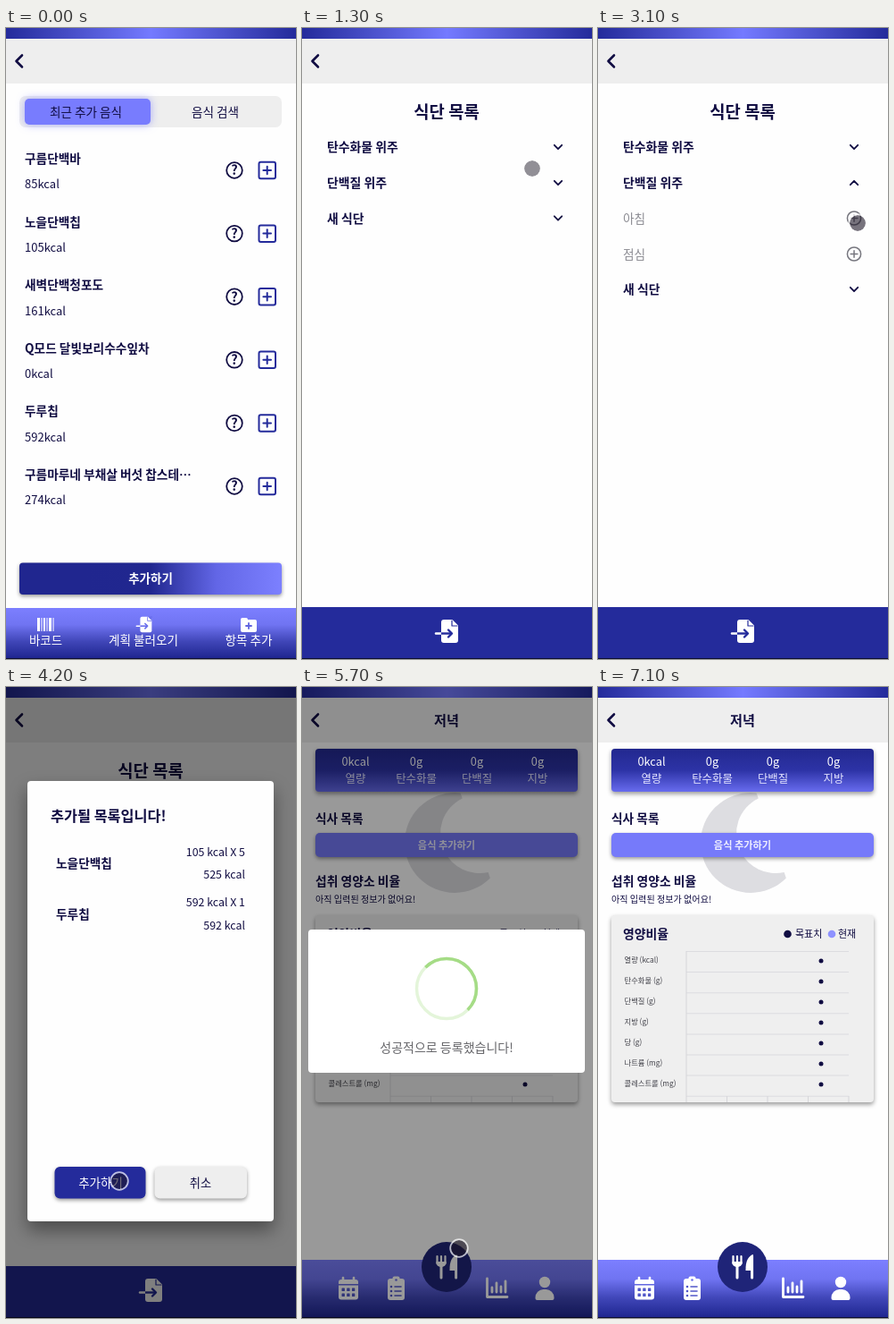
Recreate the animation shown at these times as an HTML page with a canvas. Size 325 by 705 pixels, loop 7600 ms.

```html
<!DOCTYPE html>
<html lang="ko">
<head>
<meta charset="utf-8">
<title>식단 추가</title>
<style>
html, body { margin: 0; width: 100%; height: 100%; overflow: hidden; background: #fff; }
canvas { display: block; width: 325px; height: 705px; }
</style>
</head>
<body>
<canvas id="stage" width="325" height="705"></canvas>
<script>
const ctx = document.getElementById('stage').getContext('2d');
const W = 325, H = 705, LOOP = 7600, STEP = 100;
const NAVY = '#100c42', INDIGO = '#242b9b', LILAC = '#787cfe', PALE = '#eeeeee', GREEN = '#a5dc86';
const FONT = '"Noto Sans CJK KR", "Noto Sans CJK", "Noto Sans", sans-serif';

const BAR = '구름단백바', CHIP = '노을단백칩', SNACK = '두루칩';
const APPLE = '새벽단백청포도', TEA = 'Q모드 달빛보리수수잎차', STEAK = '구름마루네 부채살 버섯 찹스테⋯';
const FOODS = [[BAR, 85], [CHIP, 105], [APPLE, 161], [TEA, 0], [SNACK, 592], [STEAK, 274]];
const FOODS_AFTER = [FOODS[0], FOODS[2], FOODS[3], FOODS[5], ['점심상 어느만큼 담아볼까 닭가⋯', 175], ['', 350]];

const clamp = v => Math.max(0, Math.min(1, v));
const progress = (t, from, to) => clamp((t - from) / (to - from));
const ease = p => p * p * (3 - 2 * p);
const mix = (a, b, p) => a + (b - a) * p;

function text(str, x, y, size, color = NAVY, weight = 400, align = 'left') {
  ctx.font = `${weight} ${size}px ${FONT}`;
  ctx.fillStyle = color;
  ctx.textAlign = align;
  ctx.fillText(str, x, y + size * 0.37);
}

function box(x, y, w, h, r, fill, shadow = 0) {
  ctx.save();
  if (shadow) {
    ctx.shadowColor = 'rgba(0,0,0,.4)';
    ctx.shadowBlur = shadow;
    ctx.shadowOffsetY = shadow / 2;
  }
  ctx.fillStyle = fill;
  ctx.beginPath();
  ctx.roundRect(x, y, w, h, r);
  ctx.fill();
  ctx.restore();
}

function disc(x, y, r, fill) {
  ctx.fillStyle = fill;
  ctx.beginPath();
  ctx.arc(x, y, r, 0, Math.PI * 2);
  ctx.fill();
}

function ring(x, y, r, color, width, from = 0, to = Math.PI * 2) {
  ctx.strokeStyle = color;
  ctx.lineWidth = width;
  ctx.beginPath();
  ctx.arc(x, y, r, from, to);
  ctx.stroke();
}

function line(points, color, width, cap = 'round') {
  ctx.strokeStyle = color;
  ctx.lineWidth = width;
  ctx.lineCap = cap;
  ctx.lineJoin = 'round';
  ctx.beginPath();
  points.forEach(([x, y]) => ctx.lineTo(x, y));
  ctx.stroke();
}

function plus(x, y, r, color, width) {
  line([[x - r, y], [x + r, y]], color, width);
  line([[x, y - r], [x, y + r]], color, width);
}

function gradient(x0, y0, x1, y1, ...colors) {
  const g = ctx.createLinearGradient(x0, y0, x1, y1);
  colors.forEach((c, i) => g.addColorStop(i / (colors.length - 1), c));
  return g;
}

function dim(alpha) {
  ctx.fillStyle = `rgba(0,0,0,${alpha})`;
  ctx.fillRect(0, 0, W, H);
}

function frame() {
  box(0, 0, W, H, 0, '#fefefe');
  box(0, 12, W, 50, 0, PALE);
  box(0, 0, W, 12, 0, gradient(0, 0, W, 0, INDIGO, '#747aff', INDIGO));
  line([[18, 30.5], [11.5, 37], [18, 43.5]], NAVY, 2.6);
}

function bottomBar(y, fill) {
  box(0, y, W, H - y, 0, fill);
  box(0, 704, W, 1, 0, '#0c0e30');
}

const glow = y => gradient(0, y, 0, 704, '#7c7fff', '#7074f2', '#4046b8', '#1f2690');

function fileImport(x, y, s, bg) {
  ctx.save();
  ctx.translate(x, y);
  ctx.scale(s, s);
  ctx.fillStyle = '#fff';
  ctx.beginPath();
  ctx.roundRect(-6, -13, 19, 26, 3);
  ctx.fill();
  ctx.fillStyle = bg;
  ctx.beginPath();
  ctx.moveTo(6, -13.5);
  ctx.lineTo(13.5, -13.5);
  ctx.lineTo(13.5, -6);
  ctx.fill();
  line([[6, -12], [6, -6], [12, -6]], bg, 1.2);
  line([[-12, 2.5], [-6, 2.5]], '#fff', 2.4);
  line([[-6, 2.5], [5, 2.5]], bg, 2.4, 'butt');
  line([[2, -1.5], [6, 2.5], [2, 6.5]], bg, 2.4);
  ctx.restore();
}

function foodRow([name, kcal], i) {
  const y = 146 + i * 70.6;
  text(name, 21, y, 13.7, NAVY, 700);
  text(kcal + 'kcal', 21, y + 28.5, 13);
  ring(256, y + 13, 8.8, NAVY, 1.8);
  text('?', 256, y + 13, 14.5, NAVY, 700, 'center');
  ctx.strokeStyle = INDIGO;
  ctx.lineWidth = 2;
  ctx.beginPath();
  ctx.roundRect(283.5, y + 3.8, 18.5, 18.5, 2);
  ctx.stroke();
  plus(292.7, y + 13, 4.3, INDIGO, 2);
}

function toast(y, name, detail) {
  box(15, y, 294, 56.5, 4, INDIGO, 3);
  text(name, 32, y + 18, 14.4, '#f4f4ff');
  text(detail, 32, y + 37, 14.2, '#f4f4ff');
  line([[279, y + 21], [292, y + 35]], '#fff', 2);
  line([[292, y + 21], [279, y + 35]], '#fff', 2);
}

function foodPage(added) {
  frame();
  box(15, 76, 294, 35, 7, PALE);
  ctx.save();
  ctx.shadowColor = 'rgba(120,124,254,.6)';
  ctx.shadowBlur = 10;
  box(21, 79, 141, 29, 5, LILAC);
  ctx.restore();
  text('최근 추가 음식', 89.5, 93.5, 13.6, NAVY, 400, 'center');
  text('음식 검색', 234.5, 93.5, 13.6, NAVY, 400, 'center');
  (added ? FOODS_AFTER : FOODS).forEach(foodRow);
  if (added) {
    toast(471, SNACK, '592 kcal X 1 개 = 592 kcal');
    toast(534.5, CHIP, '105 kcal X 5 개 = 525 kcal');
  }
  box(15, 597.5, 294, 35.5, 4, gradient(15, 0, 309, 0, '#20268f', '#20268f', '#21278f', '#6266e6', '#7c80ff'), 4);
  text('추가하기', 162, 615.5, 13.5, '#fff', 700, 'center');

  bottomBar(648, glow(648));
  [[35, 3], [39.5, 1], [42, 2], [45.5, 1], [48, 3], [52.5, 1]].forEach(([x, w]) => box(x, 659, w, 15, 0, '#fff'));
  fileImport(154.5, 666.5, 0.68, '#6a6eec');
  box(263, 661, 18, 14, 2, '#fff');
  box(263, 659, 8, 5, 2, '#fff');
  plus(272, 668, 3, '#5f63df', 1.8);
  text('바코드', 44.5, 684, 13.4, '#fff', 400, 'center');
  text('계획 불러오기', 154, 684, 13.6, '#fff', 400, 'center');
  text('항목 추가', 272, 684, 13.6, '#fff', 400, 'center');
}

function chevron(y, up) {
  const d = up ? -2.2 : 2.2;
  line([[282.8, y - d], [287, y + d], [291.2, y - d]], NAVY, 1.8);
}

function planPage(open) {
  frame();
  text('식단 목록', 162, 94, 18.8, NAVY, 700, 'center');
  text('탄수화물 위주', 28, 133, 13.9, NAVY, 700);
  chevron(133);
  text('단백질 위주', 28, 173, 13.9, NAVY, 700);
  chevron(173, open > 0.5);
  ctx.save();
  ctx.globalAlpha = open;
  ctx.beginPath();
  ctx.rect(0, 190, W, 82 * open);
  ctx.clip();
  ['아침', '점심'].forEach((meal, i) => {
    const y = 212.5 + i * 40;
    text(meal, 28, y, 13.7, '#8b8b92');
    ring(287, y, 7.6, '#77777f', 1.5);
    plus(287, y, 3.8, '#77777f', 1.5);
  });
  ctx.restore();
  const last = mix(212.5, 292, open);
  text('새 식단', 28, last, 13.9, NAVY, 700);
  chevron(last);
  bottomBar(647, INDIGO);
  fileImport(162, 674, 1, INDIGO);
}

function confirmDialog(p) {
  if (!p) return;
  dim(0.5 * p);
  ctx.save();
  ctx.globalAlpha = p;
  box(24, 105, 276, 492, 4, '#fefefe', 20);
  text('추가될 목록입니다!', 50, 144, 16.3, NAVY, 700);
  [[CHIP, '105 kcal X 5', '525 kcal'], [SNACK, '592 kcal X 1', '592 kcal']].forEach(([name, rate, sum], i) => {
    const y = 184 + i * 56.5;
    text(name, 56, y + 13, 13.7, NAVY, 700);
    text(rate, 268, y, 12.4, NAVY, 400, 'right');
    text(sum, 268, y + 25.5, 12.4, NAVY, 400, 'right');
  });
  box(54.5, 536, 102, 35.5, 6, INDIGO, 4);
  box(166.5, 536, 103.5, 35.5, 6, PALE, 4);
  text('추가하기', 106, 554, 13.5, '#fff', 400, 'center');
  text('취소', 218, 554, 13.2, NAVY, 500, 'center');
  ctx.restore();
}

function moon() {
  ctx.fillStyle = '#dddde1';
  ctx.beginPath();
  ctx.arc(171, 174, 56, 0.78, 4.83);
  ctx.arc(199, 164, 44, 4.26, 1.35, true);
  ctx.fill();
}

function tabIcons() {
  // calendar
  box(41, 662, 22, 5, [3, 3, 0, 0], '#fff');
  box(41, 668.5, 22, 16, [0, 0, 3, 3], '#fff');
  [46, 58].forEach(x => line([[x, 660], [x, 664]], '#fff', 2.6));
  for (let i = 0; i < 6; i++) box(44.5 + (i % 3) * 5.7, 671.5 + Math.floor(i / 3) * 6, 3.4, 3.4, 0.5, '#5157c9');
  // clipboard
  box(96, 661, 19, 24, 3, '#fff');
  box(101.5, 658.5, 8, 5, 2, '#fff');
  disc(105.5, 662.5, 1.3, '#6a6eec');
  [670, 675, 680].forEach(y => {
    disc(100, y, 1.3, '#5157c9');
    line([[104, y], [111, y]], '#5157c9', 1.6);
  });
  // bar chart
  line([[207.5, 661], [207.5, 681.5], [230, 681.5]], '#fff', 2.8);
  [[213, 671], [218, 666], [223, 670], [228, 664]].forEach(([x, y]) => line([[x, y], [x, 676]], '#fff', 2.8));
  // person
  disc(272, 665, 6.2, '#fff');
  box(261.5, 673, 21, 12, [9, 9, 2, 2], '#fff');
  // fork and knife
  disc(162, 648, 28, '#1f2478');
  [151.5, 156, 160.5].forEach(x => line([[x, 636], [x, 644]], '#fff', 2.2));
  box(150.4, 642, 11.2, 6, [0, 0, 5, 5], '#fff');
  line([[156, 646], [156, 660]], '#fff', 3);
  ctx.fillStyle = '#fff';
  ctx.beginPath();
  ctx.moveTo(174, 634);
  ctx.quadraticCurveTo(165, 637, 165.5, 652);
  ctx.lineTo(174, 652);
  ctx.fill();
  line([[172.6, 636], [172.6, 660]], '#fff', 3);
}

function dinnerPage() {
  frame();
  text('저녁', 162, 37, 15.2, NAVY, 700, 'center');
  moon();
  box(15, 69, 294, 48, 4, gradient(0, 69, 0, 117, '#22288f', '#2d33a6', '#676bee'), 5);
  [['0kcal', '열량'], ['0g', '탄수화물'], ['0g', '단백질'], ['0g', '지방']].forEach(([value, label], i) => {
    text(value, 60 + i * 68, 83, 12.8, '#fff', 400, 'center');
    text(label, 60 + i * 68, 102, 12.4, '#e6e6ff', 400, 'center');
  });
  text('식사 목록', 15, 147, 13.7, NAVY, 700);
  box(15, 163, 294, 27, 5, '#767afa', 4);
  text('음식 추가하기', 162, 176.5, 11.2, '#eeeeff', 700, 'center');
  text('섭취 영양소 비율', 15, 217, 13.8, NAVY, 700);
  text('아직 입력된 정보가 없어요!', 15, 237, 10.1);

  box(15, 255, 294, 209, 4, '#efefef', 5);
  text('영양비율', 28, 275.5, 13.9, NAVY, 700);
  disc(212.5, 276, 4.3, NAVY);
  text('목표치', 221, 276, 11);
  disc(262, 276, 4.3, '#8e92ff');
  text('현재', 269, 276, 11);
  for (let i = 0; i < 8; i++) box(99, 295 + i * 23.1, 182, 1, 0, '#dcdce0');
  for (let i = 0; i < 5; i++) box(98.5 + i * 45.5, i ? 457 : 295, 1, i ? 7 : 169, 0, '#d6d6da');
  ['열량 (kcal)', '탄수화물 (g)', '단백질 (g)', '지방 (g)', '당 (g)', '나트륨 (mg)', '콜레스트롤 (mg)'].forEach((label, i) => {
    text(label, 29.5, 304.5 + i * 23.1, 8.3, '#44444c');
    disc(250, 306 + i * 23, 2.5, NAVY);
  });
  bottomBar(640, glow(640));
  tabIcons();
}

// Light ring, a half turn of solid green swept away, then the tick.
function successMark(t) {
  const x = 162, y = 337, r = 33.5, deg = Math.PI / 180;
  ring(x, y, r, 'rgba(165,220,134,.3)', 3.5);
  const turn = 360 * ease(progress(t, 200, 500));
  const from = turn < 180 ? 45 - turn : -135;
  const to = turn < 180 ? 45 : 225 - turn;
  ctx.lineCap = 'butt';
  if (to > from) ring(x, y, r, GREEN, 3.5, from * deg, to * deg);
  const tip = progress(t, 405, 530), long = progress(t, 490, 650);
  if (!tip) return;
  const tick = [[x - 20, y - 1], [x - 20 + 15 * tip, y - 1 + 15 * tip]];
  if (long) tick.push([x - 5 + 28 * long, y + 14 - 28 * long]);
  line(tick, GREEN, 4.2);
}

function popupScale(t) {
  const p = progress(t, 0, 300);
  if (p < 0.45) return mix(0.7, 1.05, p / 0.45);
  return p < 0.8 ? mix(1.05, 0.95, (p - 0.45) / 0.35) : mix(0.95, 1, (p - 0.8) / 0.2);
}

function successPopup(t, hide) {
  if (hide >= 1) return;
  dim(0.4 * Math.min(progress(t, 0, 100), 1 - hide));
  const s = popupScale(t) * mix(1, 0.5, hide);
  ctx.save();
  ctx.globalAlpha = 1 - hide;
  ctx.translate(162, 351);
  ctx.scale(s, s);
  ctx.translate(-162, -351);
  box(7, 271, 310, 160, 4, '#fff');
  successMark(t);
  text('성공적으로 등록했습니다!', 162, 403, 14, '#66666a', 400, 'center');
  ctx.restore();
}

const PATH = [
  [0, 200, 725], [100, 195, 712], [500, 155, 672], [850, 155, 672], [1300, 258, 157],
  [1600, 287, 173], [1800, 287, 173], [2500, 291, 218], [3350, 291, 218], [3700, 162, 674],
  [3850, 162, 674], [4100, 127, 552], [4650, 127, 552], [5000, 176, 627], [6750, 176, 627],
  [7050, 210, 725], [LOOP, 210, 725]
];
const PRESSES = [[500, 600], [1600, 1700], [2700, 3300], [3700, 3800], [4100, 4200], [5000, 5700]];

function cursor(t) {
  const i = PATH.findIndex(k => k[0] > t);
  const [t0, x0, y0] = PATH[i - 1], [t1, x1, y1] = PATH[i];
  const p = ease(progress(t, t0, t1));
  const x = mix(x0, x1, p), y = mix(y0, y1, p);
  const pressed = PRESSES.some(([a, b]) => t >= a && t <= b);
  disc(x, y, 9, `rgba(28,22,38,${pressed ? 0.6 : 0.48})`);
  ring(x, y, 9.8, 'rgba(255,255,255,.7)', 1.8);
}

function draw(t) {
  if (t < 600) foodPage(false);
  else if (t < 4300) {
    planPage(ease(progress(t, 1650, 1900)));
    confirmDialog(progress(t, 3750, 3950));
  } else if (t < 5350) foodPage(true);
  else {
    dinnerPage();
    successPopup(t - 5350, progress(t, 6750, 6950));
  }
  cursor(t);
}

function tick() {
  const t = performance.now() % LOOP;
  draw(Math.floor(t / STEP) * STEP);
  requestAnimationFrame(tick);
}
tick();
</script>
</body>
</html>
```
